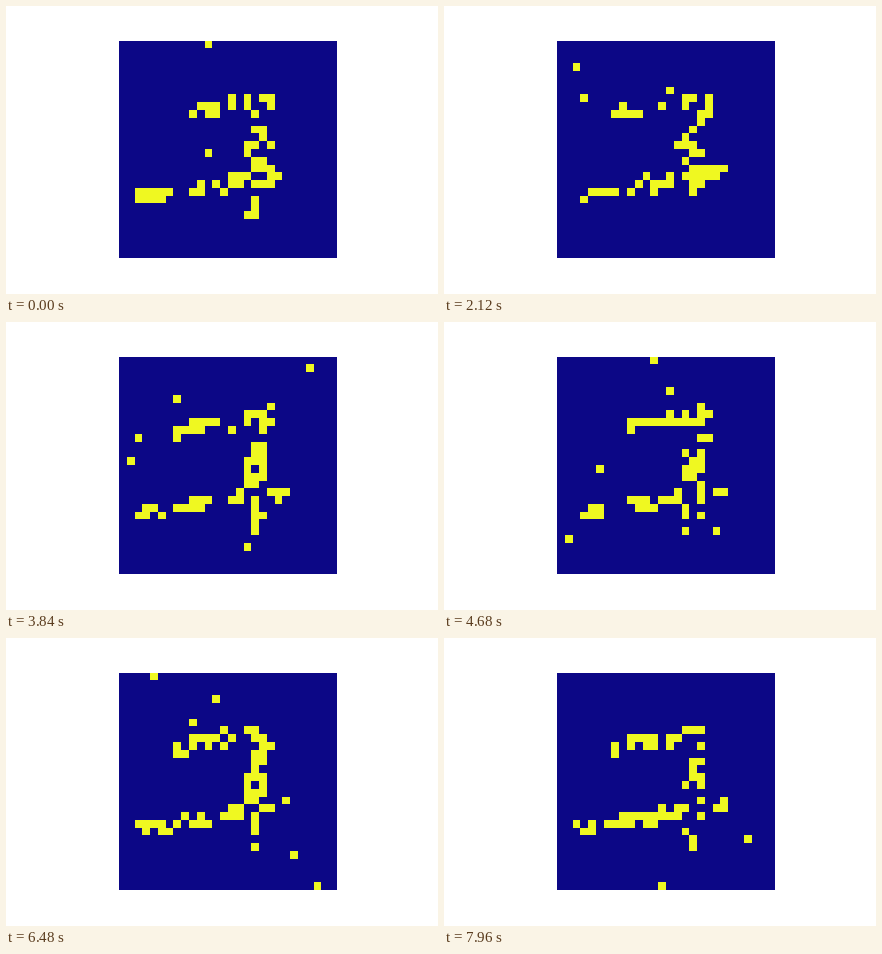
Recreate the animation shown at these times as a matplotlib script. Size 432x288 px, loop 8 s.

```python
import numpy as np
import matplotlib.pyplot as plt
from matplotlib.animation import FuncAnimation

SIZE = 28
FRAMES, INTERVAL = 200, 40
STROKE_RATE, NOISE_RATE = 0.61, 0.006
STROKE_WIDTH = 0.92

# Pen strokes of the handwritten digit: cubic Bezier curves in grid cells
ARM = (7, 9.6), (8.5, 7.8), (13, 9), (18.5, 6.7)
STEM = (18.6, 7), (18.5, 10.5), (17, 11.5), (16, 14.2)
BODY = (18, 12.3), (18.4, 16.5), (14.5, 18.6), (8, 18.5)
TAIL = (12, 18.6), (8, 18.2), (6, 19.6), (2, 19.7)
LOOP = (17, 21.8), (16, 18), (17.5, 17), (21, 16.7)


def bezier(a, b, c, d, n=60):
    t = np.linspace(0, 1, n)[:, None]
    a, b, c, d = map(np.array, (a, b, c, d))
    s = 1 - t
    return s**3 * a + 3 * s**2 * t * b + 3 * s * t**2 * c + t**3 * d


def spike_rates():
    pen = np.vstack([bezier(*s) for s in (ARM, STEM, BODY, TAIL, LOOP)])
    y, x = np.mgrid[:SIZE, :SIZE]
    dist = np.hypot(x[..., None] - pen[:, 0], y[..., None] - pen[:, 1]).min(axis=-1)
    ink = np.exp(-(dist / STROKE_WIDTH) ** 4)
    return NOISE_RATE + (STROKE_RATE - NOISE_RATE) * ink


RATES = spike_rates()


def spikes(i):
    fired = np.random.default_rng(i).random(RATES.shape) < RATES
    return fired.astype(float)


fig, ax = plt.subplots(figsize=(6, 4), dpi=72, facecolor="white")
fig.subplots_adjust(left=0.125, right=0.9, bottom=0.125, top=0.88)
ax.axis("off")
image = ax.imshow(spikes(0), cmap="plasma", vmin=0, vmax=1,
                  interpolation="nearest")


def update(i):
    image.set_data(spikes(i))
    return [image]


anim = FuncAnimation(fig, update, frames=FRAMES, interval=INTERVAL,
                     repeat=True, repeat_delay=0)
plt.show()
```
